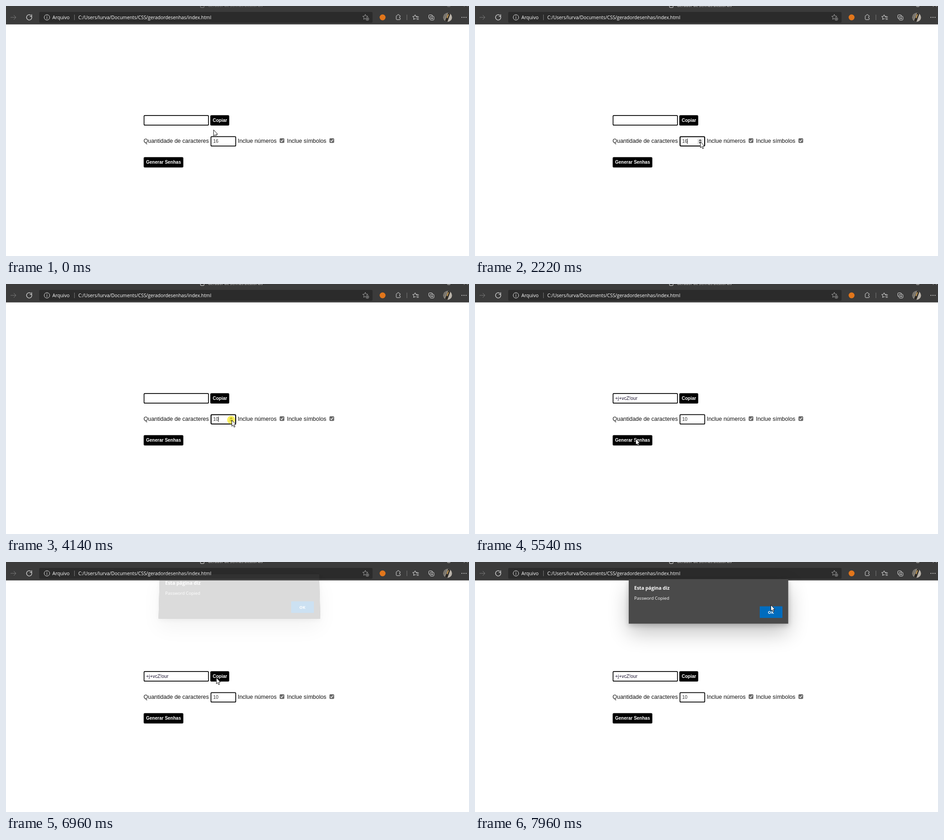
These frames come from a looping animation (1018x550 px, 8 s). An HTML page with a canvas:

```html
<!DOCTYPE html>
<html lang="pt-BR">
<head>
<meta charset="utf-8">
<title>Gerador de Senhas</title>
<style>
html, body { margin: 0; width: 100%; height: 100%; overflow: hidden; background: #fff; }
canvas { display: block; width: 1018px; height: 550px; }
</style>
</head>
<body>
<canvas id="stage"></canvas>
<script>
const W = 1018, H = 550, LOOP = 8000, STEP = 200;
const canvas = document.getElementById('stage');
const ratio = window.devicePixelRatio || 1;
canvas.width = W * ratio;
canvas.height = H * ratio;
const ctx = canvas.getContext('2d');

const UI = '"Open Sans", "Noto Sans", sans-serif';
const PAGE = '"Liberation Sans", Arial, sans-serif';
const INK = '#e6e6e6', DIM = '#7a7a7a', BAR = '#3b3b3b', FIELD = '#2b2b2b';

const steps = (t, start, n) => Math.max(0, Math.min(n, Math.floor((t - start) / STEP) + 1));
const within = (t, a, b) => t >= a && t < b;

// pointer glides along curves: start time, steps, bend, end
const moves = [
  { start: 200, n: 3, bend: [380, 365], end: [361, 342] },
  { start: 1020, n: 6, bend: [420, 298], end: [495, 298] },
  { start: 2420, n: 1, bend: [496, 299], end: [496, 299] },
  { start: 4340, n: 5, bend: [350, 366], end: [353, 340] },
  { start: 5960, n: 4, bend: [525, 285], end: [462, 254] },
  { start: 7160, n: 3, bend: [600, 330], end: [751, 431] },
  { start: 7760, n: 2, bend: [720, 220], end: [650, 94] }
];
const ease = p => p * p * (3 - 2 * p);

function pointerAt(t) {
  let pos = [456, 272];
  for (const { start, n, bend, end } of moves) {
    const p = ease(steps(t, start, n) / n), q = 1 - p;
    pos = pos.map((v, i) => q * q * v + 2 * p * q * bend[i] + p * p * end[i]);
  }
  return pos;
}

const countAt = t => 16 - steps(t, 2420, 2) - steps(t, 3140, 4);
const pressed = t => [3140, 3540, 4140, 5340].some(a => within(t, a, a + STEP));

function stroke(color, width = 1) {
  ctx.strokeStyle = color;
  ctx.lineWidth = width;
  ctx.stroke();
}

function fill(color) {
  ctx.fillStyle = color;
  ctx.fill();
}

function box(x, y, w, h, r, color) {
  ctx.beginPath();
  ctx.roundRect(x, y, w, h, r);
  fill(color);
}

// outer edges given, border lies inside
function frame(x, y, w, h, r, color, width = 1) {
  ctx.beginPath();
  ctx.roundRect(x + width / 2, y + width / 2, w - width, h - width, r);
  stroke(color, width);
}

function disc(x, y, r, color) {
  ctx.beginPath();
  ctx.arc(x, y, r, 0, Math.PI * 2);
  fill(color);
}

function ring(x, y, r, color) {
  ctx.beginPath();
  ctx.arc(x, y, r, 0, Math.PI * 2);
  stroke(color);
}

function poly(points) {
  ctx.beginPath();
  points.forEach(([x, y]) => ctx.lineTo(x, y));
  ctx.closePath();
}

function line(points, color, width = 1) {
  ctx.beginPath();
  points.forEach(([x, y]) => ctx.lineTo(x, y));
  stroke(color, width);
}

function text(str, x, y, font, color) {
  ctx.font = font;
  ctx.fillStyle = color;
  ctx.fillText(str, x, y);
}

function star(x, y, r, color) {
  poly(Array.from({ length: 10 }, (_, i) => {
    const a = (i / 5 - 0.5) * Math.PI, d = i % 2 ? r * 0.48 : r;
    return [x + Math.cos(a) * d, y + Math.sin(a) * d];
  }));
  stroke(color);
}

function plus(x, y, r, color) {
  line([[x - r, y], [x + r, y]], color);
  line([[x, y - r], [x, y + r]], color);
}

const divider = x => line([[x, 19], [x, 31]], DIM);

function titleBar(active) {
  const color = active ? '#e2e2e2' : '#8c8c8c';
  frame(427, -6, 9, 10, 1.5, color);
  text('Gerador de Senhas aleatórias', 444, 2, '8.75px ' + UI, color);
  frame(970, -5, 7, 7, 1, color);
  line([[1007, 1.5], [1011, -3], [1015, 1.5]], color);
}

function addressBar() {
  box(73, 13, 733, 24, 3, FIELD);
  ring(90, 25, 6, INK);
  line([[90, 24], [90, 28.5]], INK);
  disc(90, 22, 0.8, INK);
  text('Arquivo', 102, 29, '10.5px ' + UI, '#fff');
  divider(150.5);
  text('C:/Users/lurva/Documents/CSS/geradordesenhas/index.html', 159, 29, '10.35px ' + UI, '#fff');
  star(790, 24.5, 6, '#a5a5a5');
  disc(794.5, 28.5, 4.2, FIELD);
  ring(794.5, 28.5, 3.2, '#a5a5a5');
  plus(794.5, 28.5, 1.6, '#a5a5a5');
}

function puzzle(x, y) {
  frame(x - 5, y - 4.5, 10, 10, 1.5, INK);
  for (const [dx, dy] of [[0, -4.5], [4.5, 0]]) {
    disc(x + dx, y + dy, 2.2, BAR);
    ctx.beginPath();
    const a = dx ? Math.PI / 2 : Math.PI;
    ctx.arc(x + dx, y + dy, 1.8, a, a + Math.PI);
    stroke(INK);
  }
}

function avatar(x, y) {
  ctx.save();
  ctx.beginPath();
  ctx.arc(x, y, 9.7, 0, Math.PI * 2);
  ctx.clip();
  ctx.fillStyle = '#b9b3aa';
  ctx.fillRect(x - 10, y - 10, 20, 20);
  ctx.translate(x, y);
  ctx.rotate(0.35);
  box(-12, -12, 8, 24, 0, '#77736c');
  box(-3, -10, 6, 22, 3, '#2d2925');
  box(-2, -7, 2.5, 9, 1, '#c69d58');
  ctx.restore();
}

function toolbar(active) {
  box(0, 0, W, 40.5, 0, BAR);
  titleBar(active);
  line([[10, 25], [22, 25]], DIM);
  line([[17, 20], [22, 25], [17, 30]], DIM);
  ctx.beginPath();
  ctx.arc(51, 25, 5.8, -0.35, Math.PI * 1.72);
  stroke(INK, 1.2);
  line([[56.5, 18.5], [56.5, 22.8], [52.4, 22.8]], INK, 1.2);
  addressBar();

  disc(828, 25, 6.5, '#e2761b');
  puzzle(862.5, 25);
  divider(881.5);

  star(899.5, 25, 5.8, INK);
  box(901, 23.5, 7, 8, 0, BAR);
  for (let i = 0; i < 3; i++) line([[901.5 + i * 0.7, 23.5 + i * 3], [907.5, 23.5 + i * 3]], INK);

  frame(929, 19, 9, 9, 2, INK);
  box(931.5, 22, 10, 10, 2, BAR);
  frame(932, 22, 9.5, 9.5, 2, INK);
  plus(936.7, 26.8, 2.3, INK);

  avatar(971, 25);
  for (let i = 0; i < 3; i++) disc(1002.5 + i * 4.5, 25, 1, INK);
}

function checkbox(x) {
  box(x, 291, 10.3, 10.3, 2, '#686868');
  line([[x + 2.2, 296.3], [x + 4.3, 298.5], [x + 8.2, 293.6]], '#fff', 1.4);
}

function button(label, x, y, w) {
  box(x, y, w, 22.8, 2.5, '#000');
  text(label, x + 5.3, y + 15, 'bold 10px ' + PAGE, '#fff');
}

function spinner(x, y) {
  box(x - 6, y - 7, 12, 13.5, 0, '#e8e8e8');
  for (const d of [-1, 1]) {
    poly([[x - 3.5, y + d], [x, y + d * 5], [x + 3.5, y + d]]);
    fill('#555');
  }
}

function page(t) {
  const label = '12.48px ' + PAGE, small = '10.4px ' + PAGE;
  const focused = within(t, 2020, 5340);

  frame(302.7, 240, 143.4, 23, 2, '#000', 1.7);
  if (t >= 5340) text('+j+vcZ!our', 308, 255, small, '#1c1430');
  button('Copiar', 449.2, 240.2, 41.6);

  text('Quantidade de caracteres', 302.5, 301, label, '#111');
  frame(449.8, 286.5, 56.2, 22.5, 2, '#000', focused ? 2.1 : 1.7);
  text(countAt(t), 455.5, 301, small, '#333');
  if (within(t, 1820, 4540)) spinner(495, 298);
  if (focused) box(466.5, 291.5, 1, 12, 0, '#111');

  text('Inclue números', 509.7, 301, label, '#111');
  checkbox(601.7);
  text('Inclue símbolos', 617.7, 301, label, '#111');
  checkbox(711.2);
  button('Generar Senhas', 302.7, 332.4, 87.2);
}

function dialog(t) {
  if (t < 6960) return;
  const opening = t < 6960 + STEP;
  const flare = opening ? 2.5 : 0, top = opening ? 27 : 38, bottom = top + 97.5;
  const panel = () => poly([[338, top], [688.5, top], [688.5 + flare, bottom], [338 - flare, bottom]]);

  ctx.save();
  ctx.globalAlpha = opening ? 0.2 : 1;
  // shadows fall outside the panel only
  ctx.save();
  panel();
  ctx.rect(0, 0, W, H);
  ctx.clip('evenodd');
  for (const [dy, blur, alpha] of [[20, 45, 0.24], [4, 11, 0.2]]) {
    ctx.shadowColor = `rgba(0,0,0,${alpha})`;
    ctx.shadowBlur = blur * ratio;
    ctx.shadowOffsetY = dy * ratio;
    panel();
    fill('#4a4a4a');
  }
  ctx.restore();
  panel();
  fill('#4a4a4a');

  ctx.globalAlpha = 1;
  const bx = opening ? 627 : 626;
  box(bx, top + 59.5, 50, 25.5, 1, opening ? '#cce1f2' : '#006cbe');
  text('Esta página diz', 350, top + 23, 'bold 10.5px ' + UI, '#fff');
  text('Password Copied', 350, top + 45, '9.6px ' + UI, '#fff');
  text('OK', bx + 18, top + 75.5, 'bold 9px ' + UI, '#fff');
  ctx.restore();
}

function pointer(t) {
  const [x, y] = pointerAt(t);
  if (pressed(t)) disc(x - 1, y, 9, 'rgba(255,236,0,.6)');
  ctx.save();
  ctx.translate(x, y);
  poly([[0.5, 0.5], [0.5, 14], [3.4, 11.3], [5.5, 16], [7.6, 15.1], [5.6, 10.5], [9.4, 10.2]]);
  fill('#fff');
  stroke('#111');
  ctx.restore();
}

function draw(t) {
  ctx.setTransform(ratio, 0, 0, ratio, 0, 0);
  box(0, 0, W, H, 0, '#fff');
  toolbar(t >= 1820);
  page(t);
  dialog(t);
  pointer(t);
}

const start = performance.now();
function tick() {
  draw((performance.now() - start) % LOOP);
  requestAnimationFrame(tick);
}
tick();
</script>
</body>
</html>
```
